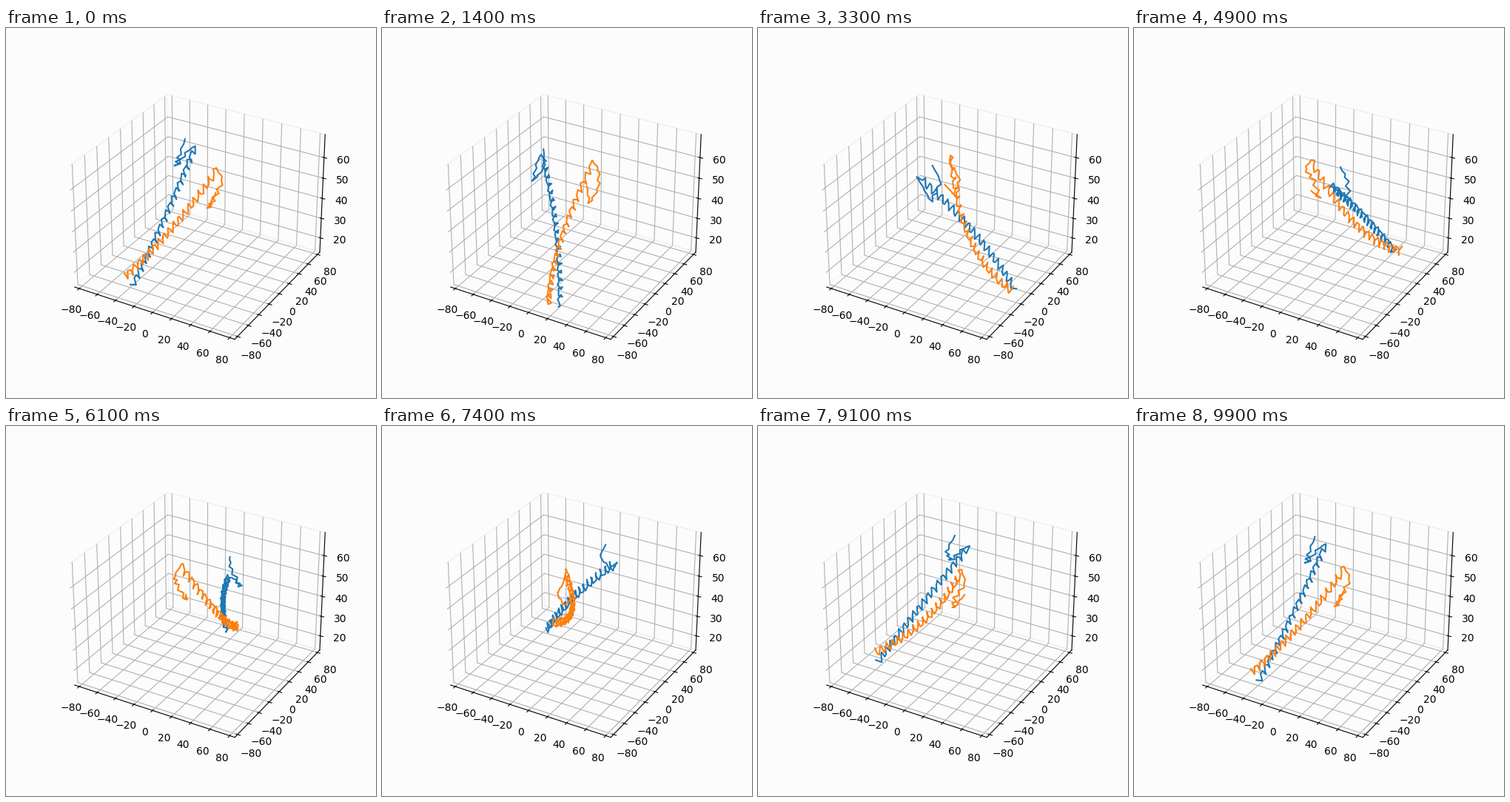
A matplotlib script that plays this animation: 500x500 px, repeating every 10000 ms.

```python
import numpy as np
import matplotlib.pyplot as plt
from matplotlib.animation import FuncAnimation

FRAMES = 100
BG = "#fcfcfc"
REACH = 85.1           # half width of the floor
MID_Z = 41.9
VIEW_TURN = np.pi / 6  # chain coordinates are (right, back, up) in the view


def helix(start, end, bow, phase, radius=2.3, rise=1.5):
    """Alpha helix, 100 degrees per residue, around a bowed axis."""
    start, end, bow = map(np.array, (start, end, bow))
    span = end - start
    n = round(np.linalg.norm(span) / rise) + 1
    t = np.linspace(0, 1, n)[:, None]
    axis = start + t * span + 4 * t * (1 - t) * bow

    tangent = span + 4 * (1 - 2 * t) * bow
    tangent /= np.linalg.norm(tangent, axis=1, keepdims=True)
    e1 = np.array([0, 0, 1]) - tangent * tangent[:, 2:]
    e1 /= np.linalg.norm(e1, axis=1, keepdims=True)
    e2 = np.cross(tangent, e1)

    a = np.radians(phase + 100 * np.arange(n))[:, None]
    return axis + radius * (np.cos(a) * e1 + np.sin(a) * e2)


def loop(*keys, step=3.0, sway=2.2):
    """Path through key points, swaying sideways at every other residue."""
    keys = np.array(keys)
    dist = np.r_[0, np.cumsum(np.linalg.norm(np.diff(keys, axis=0), axis=1))]
    n = round(dist[-1] / step) + 1
    t = np.linspace(0, 1, n)
    path = np.stack([np.interp(t * dist[-1], dist, k) for k in keys.T], axis=1)
    path[:, 0] += sway * np.sin(np.pi * t) * (-1) ** np.arange(n)
    return path


def rotated(chain, angle):
    c, s = np.cos(angle + VIEW_TURN), np.sin(angle + VIEW_TURN)
    u, b, z = chain.T
    return c * u - s * b, s * u + c * b, z + MID_Z


blue = np.vstack([
    (-64.2, -33.2, -27.3),
    helix((-60, -31.5, -26.3), (-6, 33, 20), (1.2, -4.5, 0.8), 180),
    loop((-4, 38, 22), (-11, 37, 20), (-21.5, 33, 13.5),
         (-19, 21, 21), (-13.4, 26.8, 28)),
])
orange = np.vstack([
    helix((-69.5, -26, -26), (14, -8, 20.5), (0, 11.7, -5.7), 0),
    loop((15.4, -7.2, 22.6), (21.5, -10, 17.5), (14, -16, 11),
         (8, -10, 3.5), (15, -1.3, 9.3)),
])

fig = plt.figure(figsize=(5, 5), dpi=100, facecolor=BG)
ax = fig.add_subplot(projection="3d", facecolor=BG)
ax.set(xlim=(-REACH, REACH), ylim=(-REACH, REACH), zlim=(12.7, 71.1))
ax.set_xticks(range(-80, 81, 20))
ax.set_yticks(range(-80, 81, 20))
ax.set_zticks(range(20, 61, 10))
for axis in (ax.xaxis, ax.yaxis, ax.zaxis):
    axis.pane.set_alpha(1)
    axis.pane.set_facecolor(BG)
    axis.pane.set_edgecolor("#f0f0f0")

chains = (blue, orange)
lines = [ax.plot(*rotated(chain, 0))[0] for chain in chains]


def update(i):
    angle = 2 * np.pi * i / FRAMES
    for line, chain in zip(lines, chains):
        line.set_data_3d(*rotated(chain, angle))
    return lines


anim = FuncAnimation(fig, update, frames=FRAMES, interval=100,
                     repeat=True, repeat_delay=0)
plt.show()
```
